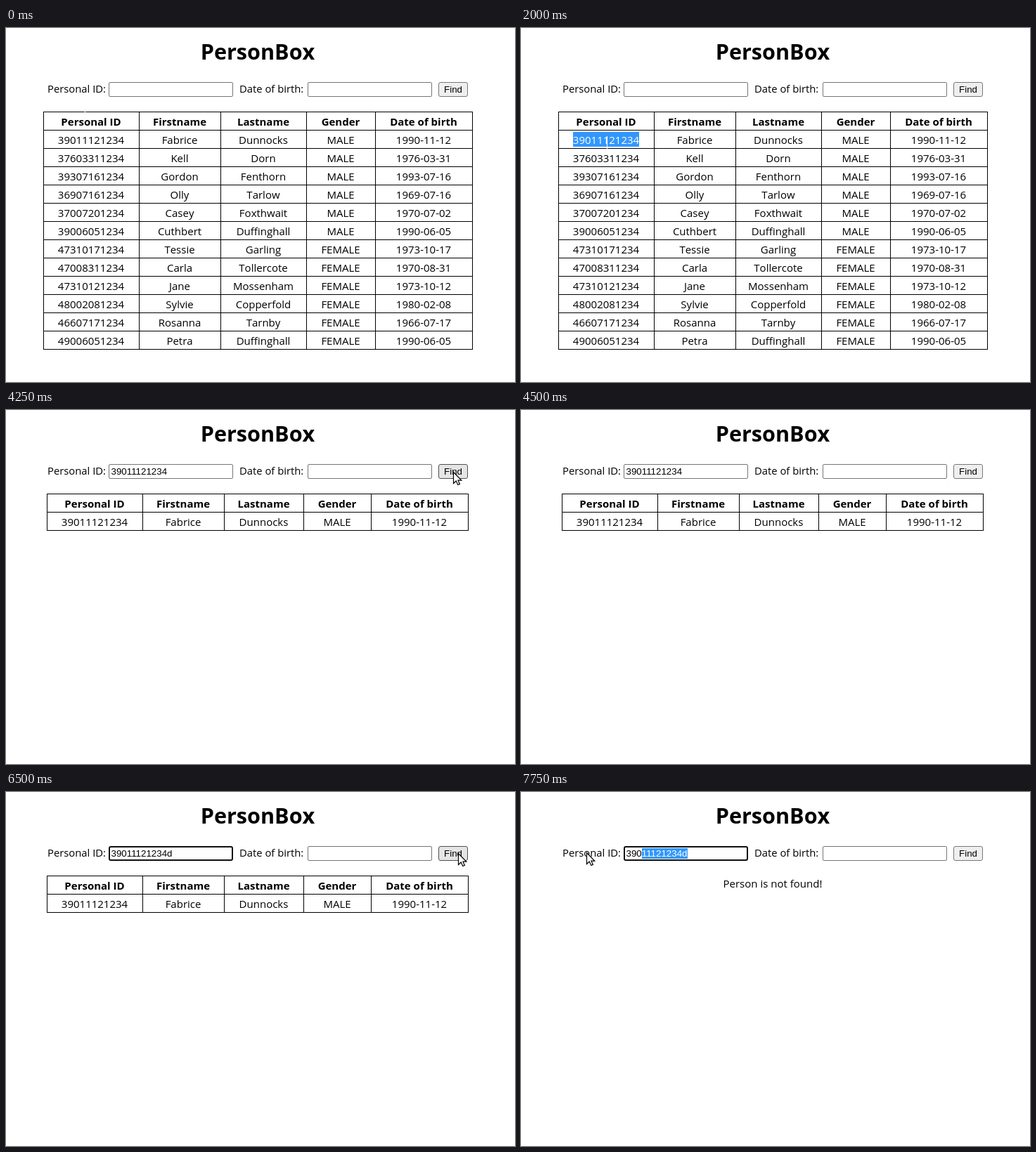
Animation of 724 by 504 pixels, one loop 8000 ms. Source, as an HTML page:

```html
<!DOCTYPE html>
<html lang="en">
<head>
<meta charset="utf-8">
<style>
  html, body { margin: 0; height: 100%; overflow: hidden; background: #fff; }
  svg { display: block; width: 724px; height: 504px; }
  text { font: 15px "Open Sans", "Noto Sans", sans-serif; font-kerning: none; }
  .mid { text-anchor: middle; }
  .bold { font-weight: 700; }
  .label { font-size: 14.8px; }
  .title { font-size: 30.6px; }
  .ui { font: 13.333px "Liberation Sans", Arial, sans-serif; }
  .field { fill: #fff; stroke: #767676; }
  .focus { fill: #fff; stroke: #101010; stroke-width: 2; }
  .line { fill: none; stroke: #000; }
</style>
</head>
<body>
<svg id="stage" viewBox="0 0 724 504"></svg>
<script>
const LOOP = 8000, STEP = 250;
const ID = '39011121234';
const HEAD = ['Personal ID', 'Firstname', 'Lastname', 'Gender', 'Date of birth'];
const PEOPLE = `39011121234 Fabrice Dunnocks MALE 1990-11-12
37603311234 Kell Dorn MALE 1976-03-31
39307161234 Gordon Fenthorn MALE 1993-07-16
36907161234 Olly Tarlow MALE 1969-07-16
37007201234 Casey Foxthwait MALE 1970-07-02
39006051234 Cuthbert Duffinghall MALE 1990-06-05
47310171234 Tessie Garling FEMALE 1973-10-17
47008311234 Carla Tollercote FEMALE 1970-08-31
47310121234 Jane Mossenham FEMALE 1973-10-12
48002081234 Sylvie Copperfold FEMALE 1980-02-08
46607171234 Rosanna Tarnby FEMALE 1966-07-17
49006051234 Petra Duffinghall FEMALE 1990-06-05`.split('\n').map(row => row.split(' '));

// Column edges of the full and the filtered table
const WIDE = [53, 189, 305, 427, 525, 663];
const NARROW = [58, 194, 310, 423, 519, 657];

// Pointer positions: start time, shape, x, y
const POINTER = [
  [0, 'beam', 112, 124], [500, 'beam', 114, 136], [750, 'beam', 116, 150],
  [1000, 'beam', 118, 164], [1250, 'beam', 120, 176], [1500, 'beam', 122, 184],
  [2000, 'beam', 122, 163], [2750, 'arrow', 150, 112], [3000, 'beam', 250, 90],
  [3500, 'arrow', 387, 98], [3750, 'arrow', 563, 100], [4000, 'arrow', 636, 88],
  [4500, 'beam', 607, 105], [4750, 'beam', 440, 104], [5000, 'beam', 287, 92],
  [6000, 'arrow', 470, 102], [6250, 'arrow', 610, 98], [6500, 'arrow', 643, 87],
  [7000, 'arrow', 540, 102], [7250, 'arrow', 340, 100], [7500, 'beam', 240, 88],
  [7750, 'arrow', 93, 86]
];
const SHAPE = {
  arrow: '<path d="M.5 .5V16.5L4.2 13L6.8 18.5L9.4 17.4L7 12.2H11.8Z" fill="#fff" stroke="#000" stroke-width="1.2"/>',
  beam: '<path d="M.5-9V9" fill="none" stroke="#fcfcfc"/>'
};

const text = (x, y, s, cls = '', fill = '#000') =>
  `<text x="${x}" y="${y}" class="${cls}" fill="${fill}">${s}</text>`;
const box = (x, y, w, h, attrs) =>
  `<rect x="${x}" y="${y}" width="${w}" height="${h}" ${attrs}/>`;
const mark = (x, y, w, h) => box(x, y, w, h, 'fill="#3297fd"');
const within = (t, from, to) => t >= from && t < to;

function table(edges, rows, selected) {
  const left = edges[0], right = edges[5], bottom = 119 + 26 * (rows.length + 1);
  let grid = edges.map(x => `M${x + .5} 119V${bottom + 1}`).join('');
  for (let y = 119; y <= bottom; y += 26) grid += `M${left} ${y + .5}H${right + 1}`;
  const cells = [HEAD, ...rows].map((row, r) => row.map((s, c) =>
    text((edges[c] + edges[c + 1]) / 2, 139 + 26 * r, s, r ? 'mid' : 'mid bold',
      selected && r === 1 && c === 0 ? '#fff' : '#000')).join('')).join('');
  return `<path class="line" d="${grid}"/>` + (selected ? mark(74, 148, 94, 21) : '') + cells;
}

function idField(t) {
  const focus = within(t, 3000, 4000) || within(t, 5000, 6750) || t >= 7750;
  const value = t < 3250 ? '' : t < 5750 ? ID : ID + 'd';
  const caret = 149 + value.length * 7.415;
  let out = focus ? box(147, 78, 175, 19, 'rx="2" class="focus"')
                  : box(146.5, 77.5, 176, 20, 'rx="1.5" class="field"');
  if (t >= 7750) {
    out += mark(172, 80, 65, 15);
    return out + text(149.5, 92, `390<tspan fill="#fff">${value.slice(3)}</tspan>`, 'ui');
  }
  out += text(149.5, 92, value, 'ui');
  // The caret blinks, half a second on and half a second off
  const blink = within(t, 3000, 3750) || within(t, 5000, 5500) || within(t, 5750, 6250);
  if (focus && blink) out += box(Math.floor(caret), 80, 1, 15, '');
  return out;
}

function scene(t) {
  const hover = within(t, 4000, 4500) || within(t, 6500, 7000);
  const [, shape, x, y] = POINTER.findLast(p => p[0] <= t);
  const result = t < 4250 ? table(WIDE, PEOPLE, within(t, 2000, 3000))
    : t < 6750 ? table(NARROW, PEOPLE.slice(0, 1), false)
    : text(358, 136, 'Person is not found!', 'mid');
  return text(358, 45, 'PersonBox', 'mid bold title') +
    text(59, 92, 'Personal ID:', 'label') + idField(t) +
    text(332, 92, 'Date of birth:', 'label') + box(429.5, 77.5, 176, 20, 'rx="1.5" class="field"') +
    box(615.5, 77.5, 41, 20, `rx="2.5" fill="${hover ? '#e5e5e5' : '#efefef'}" stroke="${hover ? '#4f4f4f' : '#767676'}"`) +
    text(636, 92, 'Find', 'ui mid') + result +
    `<g transform="translate(${x} ${y})">${SHAPE[shape]}</g>`;
}

const stage = document.getElementById('stage');
let shown = -1;
function tick() {
  const t = Math.floor(performance.now() % LOOP / STEP) * STEP;
  if (t !== shown) stage.innerHTML = scene(shown = t);
  requestAnimationFrame(tick);
}
tick();
</script>
</body>
</html>
```
